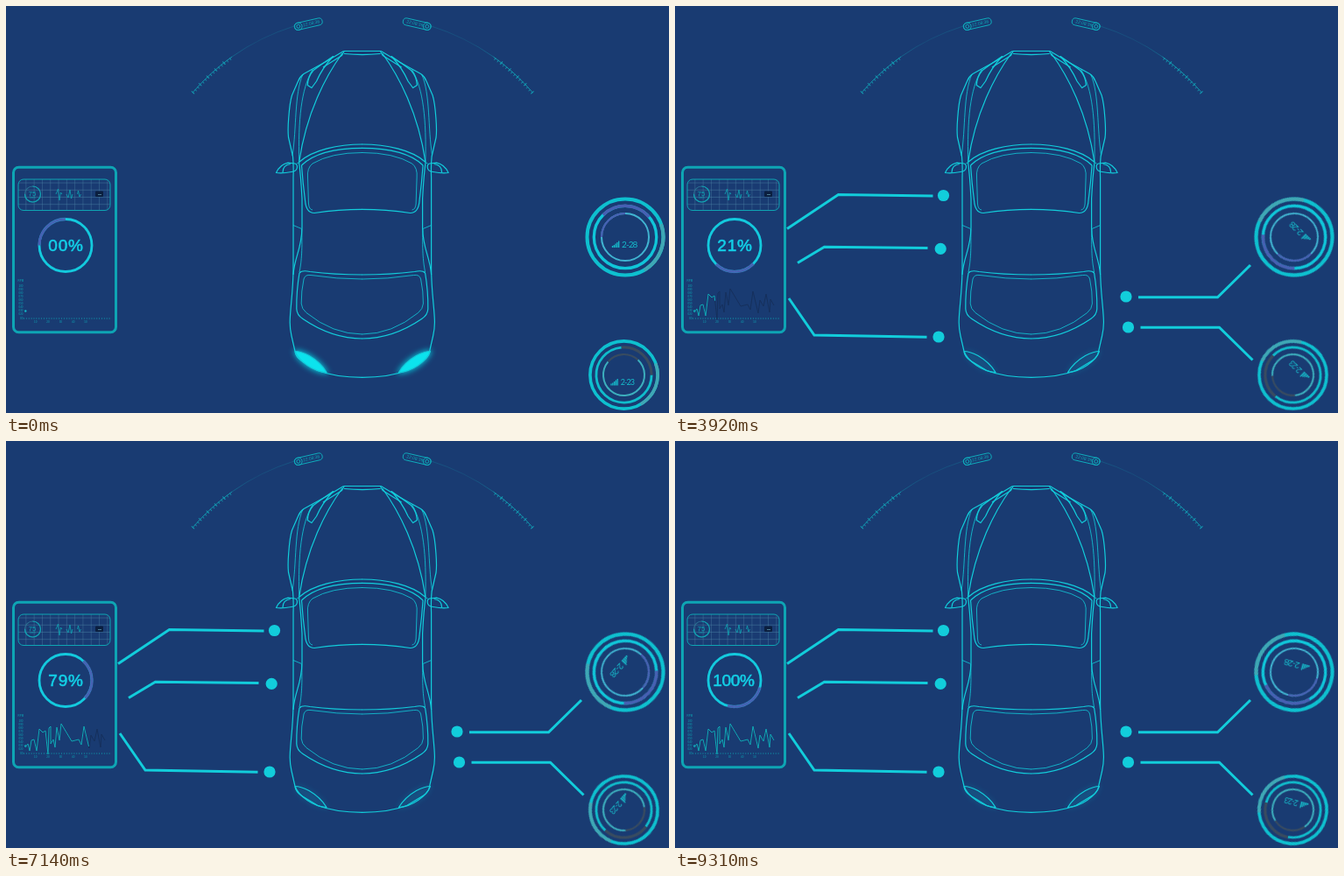
These frames come from a looping animation (757 px wide and 465 px high, 9.38 s). An HTML page without scripts:

```html
<!DOCTYPE html>
<html lang="en">
<head>
<meta charset="utf-8">
<title>Car diagnostics</title>
<style>
@property --n { syntax: "<integer>"; inherits: true; initial-value: 0; }
:root { --loop: 9380ms; --cyan: #12cddb; --teal: #0ea5b4; --bg: #193b72; }
html, body { margin: 0; width: 100%; height: 100%; overflow: hidden; background: var(--bg); }
svg { position: absolute; left: 0; top: 0; display: block; }
path, line, rect, circle, polyline { fill: none; }
.car { stroke: var(--cyan); stroke-width: 1.2; stroke-linejoin: round; }
.thin { stroke-width: .8; }
.lamps { fill: #0ce4ee; animation: lamp var(--loop) linear infinite; }
.glows { fill: #0cdcea; stroke: #0cdcea; stroke-width: 3; filter: url(#blur); animation: glow var(--loop) linear infinite; }
.lens { fill: inherit; }
.dot { fill: var(--cyan); transform-box: fill-box; transform-origin: center; animation: pop var(--loop) linear infinite; }
.lead { stroke: var(--cyan); stroke-width: 3; stroke-dasharray: 1 2; animation: lead var(--loop) linear infinite; }
.trace { stroke: #11aab9; stroke-width: 1; stroke-dasharray: 100 200; animation: trace var(--loop) linear infinite; }
.shade { stroke: #16305c; stroke-width: 1; animation: shade var(--loop) linear infinite; }
.spin { animation: spin var(--loop) linear infinite; }
.tiny { font: 3px "Liberation Sans", sans-serif; fill: var(--teal); }
.read { font: 10px Lato, sans-serif; letter-spacing: -.9px; fill: #16bccb; }
.count {
  position: absolute; left: 38px; top: 262px; width: 60px; height: 24px;
  font: 19px/24px "Liberation Sans", Arial, sans-serif; color: #13cfe6;
  -webkit-text-stroke: .6px #13cfe6;
  text-align: center; white-space: nowrap;
  animation: count var(--loop) linear infinite, tight var(--loop) step-end infinite;
}
.count::after { counter-reset: pct var(--n); content: counter(pct, decimal-leading-zero) "%"; }
@keyframes lamp { 0% { opacity: 1; } 18%, 100% { opacity: 0; } }
@keyframes glow { 0% { opacity: .85; } 21%, 100% { opacity: .13; } }
@keyframes pop { 0%, 16% { transform: scale(0); } 18%, 100% { transform: scale(1); } }
@keyframes lead { 0%, 17.9% { stroke-dashoffset: 1; visibility: hidden; } 17.91% { stroke-dashoffset: 1; visibility: visible; } 29.2%, 100% { stroke-dashoffset: 0; visibility: visible; } }
@keyframes trace { 0%, 29.53% { stroke-dashoffset: 100; } 88.7%, 100% { stroke-dashoffset: 0; } }
@keyframes shade { 0%, 29.5% { opacity: 0; } 29.53%, 100% { opacity: 1; } }
@keyframes spin { 0%, 29.53% { transform: rotate(0deg); } 100% { transform: rotate(1289deg); } }
@keyframes count { 0%, 29.53% { --n: 0; } 88.7%, 100% { --n: 100; } }
@keyframes tight { 0% { letter-spacing: .8px; text-indent: 1px; } 88.4%, 100% { letter-spacing: -.3px; text-indent: -2px; } }
</style>
</head>
<body>
<svg width="757" height="465" viewBox="0 0 757 465">
<defs>
  <filter id="blur" x="-20%" y="-100%" width="140%" height="300%"><feGaussianBlur stdDeviation="3.2"/></filter>
  <linearGradient id="fade" gradientUnits="userSpaceOnUse" x1="255" y1="0" x2="332" y2="0">
    <stop offset="0" stop-color="#0ea5b4" stop-opacity=".4"/><stop offset=".4" stop-color="#0ea5b4" stop-opacity=".14"/><stop offset="1" stop-color="#0ea5b4" stop-opacity=".25"/>
  </linearGradient>
  <pattern id="grid" x="14" y="198" width="9.3" height="8.2" patternUnits="userSpaceOnUse">
    <path d="M9 0V8.2M0 4H9.3" stroke="#4a83a5" stroke-width=".6" opacity=".75"/>
  </pattern>
  <path id="lens" class="lens" d="M330 394.500Q333 403 344 410.500Q355 418 366 418.500Q359 407 346 399.500Q336 394.500 330 394.500Z"/>
  <g id="pair"><use href="#lens"/><use href="#lens" transform="matrix(-1 0 0 1 814.500 0)"/></g>
  <path id="wave" pathLength="100" d="M22 350L25 346 27 354 29 342 32 341 35 354 38 329 42 333 45 331 48 358 49 328 51 326 51 346 54 341 56 350 58 327 61 342 63 323 75 343 83 341 86 347 89 326 95 351 97 336 101 343 104 329 108 350 109 335 113 342"/>
  <path id="bars" stroke="#16bccb" stroke-width="1.3" d="M-14.500 12V10M-12.700 12V9M-10.900 12V7.500M-9.100 12V6M-7.300 12V4.500"/>

  <g id="half">
    <path d="M385.500 51.500L364.500 64 340 77.500Q335.500 80.500 333.500 86L326.500 102Q324 110 322.700 128Q321.600 142 322.500 150L327.500 172Q328.500 182 328 196V300C328 325 324.500 345 324.200 360Q324 368 326 377L330 394.500"/>
    <path d="M330 395Q331 401 337 405L356 416.500Q376 424.300 407 424.300"/>
    <path d="M384 54C365 80 343 122 334.700 178"/>
    <path class="thin" d="M350 72.500C337 95 333.500 130 334.700 178M339 78C329 100 332 140 327 171"/>
    <path d="M386 52L383.500 56.500 362 70"/>
    <path d="M373.500 57.500Q361 66 351 73.500Q344.500 81 344.300 90.500L349 93.500 354.500 86Q361 71 373.500 57.500Z"/>
    <path d="M334.500 178.500C350 164 380 158 407 158M337.500 182C353 167 381 162.400 407 162.400"/>
    <path d="M337.500 182Q339 203 341.500 222Q342.500 236.500 352 236.500Q380 232.300 407 232.300"/>
    <path class="thin" d="M344.500 196Q343.500 185 350 180Q371 167.500 407 167.500M344.500 196L345.500 226Q346 232.500 350 233"/>
    <path d="M334.500 178.500Q336.500 192 338 220V252C338 277 329.500 286 328 307"/>
    <path class="thin" d="M328 250.500L337.500 254.500M337.700 255C338.500 282 337 294 335 304"/>
    <path d="M335 305Q338 301.500 347 303.500Q375 307 407 307M335 305Q331.500 326 331.800 346Q332 353 339 357.500Q372 380 407 380"/>
    <path class="thin" d="M340 312Q341.500 306.500 348 307.500Q378 312 407 312M340 312Q337 326 337.200 340Q337.500 346 343 350.500Q373 375 407 375"/>
    <path d="M308.500 190.500Q313 181 322 179.200L330 180Q333 181 332.300 185Q331.500 189 326 189.500Q315 191.700 308.500 190.500ZM316 190Q316 181.500 325 180.500"/>
    <path class="thin" d="M332 180L335 178.500"/>
  </g>

  <g id="arc">
    <g stroke="#11b3c1" opacity=".75">
      <path d="M213 99A256.400 256.400 0 0 1 258 58" stroke-width="1"/>
      <path d="M213.800 99.700A255.400 255.400 0 0 1 258.700 58.700" stroke-width="3" stroke-dasharray=".8 3.300"/>
      <path d="M213 99A256.400 256.400 0 0 1 258 58" stroke-width="4" stroke-dasharray="1 11.200"/>
    </g>
    <path d="M258 58A256.400 256.400 0 0 1 329 23" stroke="url(#fade)"/>
    <g stroke="#0fb0be" stroke-width=".9" transform="rotate(-13 345 20.700)">
      <rect x="329" y="16.700" width="32.500" height="8" rx="4"/>
      <circle cx="333.500" cy="20.700" r="4.300"/><circle cx="333.500" cy="20.700" r="2"/>
    </g>
  </g>

  <g id="big">
    <circle r="43.500" stroke="#0ec0cf" stroke-width="4"/>
    <path d="M40.900 -14.900A43.500 43.500 0 0 1 21.750 37.670" stroke="#40a7b4" stroke-width="4"/>
    <circle r="35.700" stroke="#10c6d9" stroke-width="3.300"/>
    <path d="M-25.200 -25.200A35.700 35.700 0 0 1 27.300 -23" stroke="#475fb2" stroke-width="3.500"/>
    <circle r="27" stroke="#40b4d1" stroke-width="2"/>
    <path d="M-27 0A27 27 0 0 1 0 -27" stroke="#475fb2" stroke-width="2.200"/>
    <use href="#bars"/>
  </g>
  <g id="small">
    <circle r="38.600" stroke="#0ec0cf" stroke-width="3.600"/>
    <path d="M36.300 -13.200A38.600 38.600 0 0 1 19.300 33.430" stroke="#40a7b4" stroke-width="3.600"/>
    <path d="M31.600 0A31.600 31.600 0 1 1 -2.800 -31.480" stroke="#10bccb" stroke-width="2.800"/>
    <path d="M-2.800 -31.480A31.600 31.600 0 0 1 31.600 0" stroke="#384b60" stroke-width="3.200"/>
    <path d="M16 -17.200A23.500 23.500 0 1 1 -18 -15.100" stroke="#3caebd" stroke-width="2"/>
    <path d="M-18 -15.100A23.500 23.500 0 0 1 16 -17.200" stroke="#384b60" stroke-width="2.200"/>
    <use href="#bars"/>
  </g>
</defs>

<rect width="757" height="465" style="fill:var(--bg)"/>

<use href="#arc"/>
<use href="#arc" transform="matrix(-1 0 0 1 814.500 0)"/>
<text class="tiny" style="font-size:5px" transform="translate(339.500 23.500) rotate(-13)">22:08:36</text>
<text class="tiny" style="font-size:5px" transform="translate(457 19.200) rotate(13)">22:08:36</text>

<g class="car">
  <use href="#half"/>
  <use href="#half" transform="matrix(-1 0 0 1 813.600 0)"/>
  <path d="M385.500 51.500H428M386 54.500Q407 56.800 427.600 54.500"/>
</g>
<g class="glows"><use href="#pair"/></g>
<g class="lamps"><use href="#pair"/></g>
<g class="car" fill="none"><use href="#pair"/></g>

<!-- side panel -->
<rect x="8.500" y="184.300" width="117" height="188.400" rx="6" stroke="#0ea5b4" stroke-width="3"/>
<rect x="14" y="198" width="105" height="35.500" rx="6" style="fill:url(#grid)" stroke="#0ea5b4"/>
<circle cx="30.500" cy="215" r="9" stroke="#2b6f92" stroke-width="1.200"/>
<path d="M30.500 206A9 9 0 1 1 21.500 215" stroke="#0ea5b4" stroke-width="1.200"/>
<text class="tiny" x="30" y="216.500" text-anchor="middle" style="font-size:8px">75</text>
<text class="tiny" x="30.500" y="220" text-anchor="middle">km/h</text>
<path d="M57 215L59.500 209 61 222 62.500 213 64 215M69 215L71 219 73 210 74.500 220 76 215M81.500 215L82.500 211 84 218 85.500 215" stroke="#0ea5b4" stroke-width=".8"/>
<rect x="102" y="211.500" width="9" height="6.500" rx="1" style="fill:#0b1f3f"/>
<path d="M105 215.500H109" stroke="#5d93a8" stroke-width=".8"/>

<circle cx="68" cy="273.500" r="30" stroke="#13cade" stroke-width="2.800"/>
<g transform="translate(68 273.500)"><path class="spin" style="transform-origin:0 0" d="M-30 0A30 30 0 0 1 0 -30" stroke="#475fb2" stroke-width="3"/></g>

<g class="tiny">
  <text x="13.500" y="315">RPM</text>
  <text x="14.500" y="320.500">100</text><text x="14.500" y="324.600">090</text>
  <text x="14.500" y="328.700">080</text><text x="14.500" y="332.800">070</text>
  <text x="14.500" y="336.900">060</text><text x="14.500" y="341">050</text>
  <text x="14.500" y="345.100">040</text><text x="14.500" y="349.200">030</text>
  <text x="14.500" y="353.300">020</text><text x="16" y="358">00</text>
  <text x="32" y="362">10</text><text x="46.300" y="362">20</text><text x="60.700" y="362">30</text>
  <text x="75" y="362">40</text><text x="89.300" y="362">50</text>
</g>
<path d="M20 357H120.500" stroke="#0ea5b4" stroke-width="1" stroke-dasharray="1 1.870"/>
<circle cx="22.300" cy="348.500" r="1.200" style="fill:#12b8c7"/>
<use href="#wave" class="shade"/>
<use href="#wave" class="trace"/>

<!-- leaders -->
<g>
  <polyline class="lead" pathLength="1" points="294.500,217 186.500,215.500 128,254.500"/>
  <polyline class="lead" pathLength="1" points="288.500,276.500 170.500,275.300 140,293.500"/>
  <polyline class="lead" pathLength="1" points="287.500,378.300 159,376 130,334"/>
  <polyline class="lead" pathLength="1" points="529,332.700 619.500,332.700 657,296"/>
  <polyline class="lead" pathLength="1" points="531.500,367.300 621.500,367.300 659.500,404.500"/>
  <circle class="dot" cx="306.500" cy="216.500" r="6.600"/>
  <circle class="dot" cx="303.200" cy="277.400" r="6.600"/>
  <circle class="dot" cx="301" cy="378" r="6.600"/>
  <circle class="dot" cx="515" cy="332" r="6.600"/>
  <circle class="dot" cx="517.500" cy="367" r="6.600"/>
</g>

<!-- gauges -->
<g transform="translate(707 264)"><g class="spin"><use href="#big"/><text class="read" x="-4" y="12.300">2-28</text></g></g>
<g transform="translate(705.500 421.500)"><g class="spin"><use href="#small"/><text class="read" x="-3.800" y="11.500" style="font-size:9px">2-23</text></g></g>
</svg>
<div class="count"></div>
</body>
</html>
```
